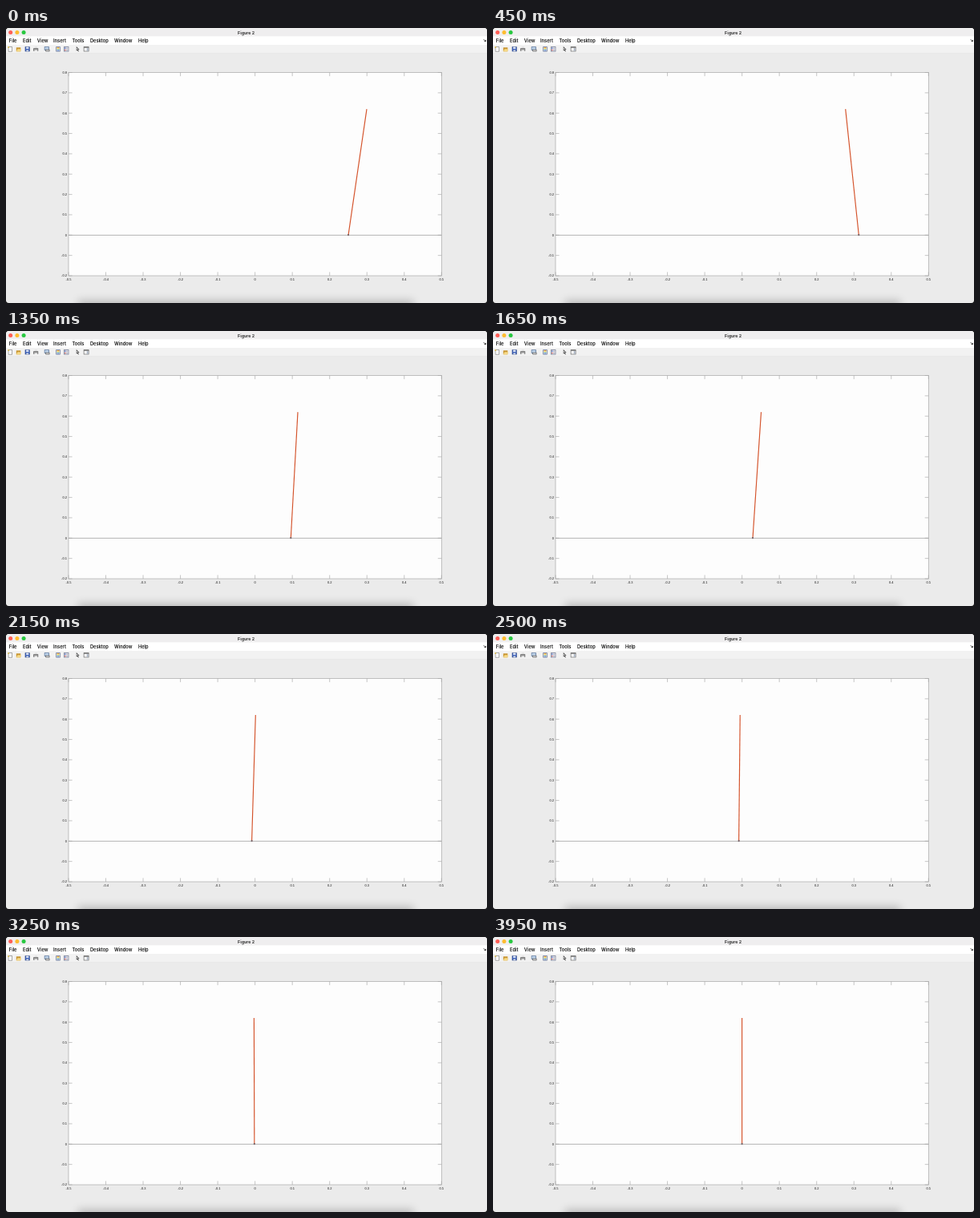
Write an HTML page with a canvas that moves like this. It is 600 by 343 pixels and loops after 4.1 s.

```html
<!DOCTYPE html>
<html lang="en">
<head>
<meta charset="utf-8">
<title>Inverted pendulum</title>
<style>
html, body { margin: 0; width: 100%; height: 100%; overflow: hidden; background: #000; }
canvas { display: block; width: 600px; height: 343px; }
</style>
</head>
<body>
<canvas id="stage"></canvas>
<script>
const W = 600, H = 343, LOOP = 4100, STEP = 50;
const canvas = document.getElementById('stage');
const ctx = canvas.getContext('2d');
const dpr = window.devicePixelRatio || 1;
canvas.width = W * dpr;
canvas.height = H * dpr;
ctx.scale(dpr, dpr);

const plot = { left: 78, right: 543.3, top: 55.5, bottom: 309 };
const px = v => plot.left + (v + 0.5) * (plot.right - plot.left);
const py = v => plot.bottom - (v + 0.2) * (plot.bottom - plot.top);

// Key poses of the swing; the motion between them is a smooth curve
const poses = [
  { t: 250, foot: 427, tip: 450 },
  { t: 450, foot: 456.3, tip: 439.7 },
  { t: 550, foot: 460.3, tip: 435.7 },
  { t: 800, foot: 437, tip: 421.8 },
  { t: 1000, foot: 404, tip: 400.5 },
  { t: 1350, foot: 355.3, tip: 364 },
  { t: 1650, foot: 324, tip: 334.5 },
  { t: 1900, foot: 311.4, tip: 319.2 },
  { t: 2150, foot: 306.6, tip: 311.3 },
  { t: 2450, foot: 306.5, tip: 308.4 },
  { t: 2850, foot: 308.7, tip: 308.8 },
  { t: 3950, foot: 310.6, tip: 310.6 }
];

const secant = (a, b, key) => (b[key] - a[key]) / (b.t - a.t);

function slope(i, key) {
  const a = poses[i - 1], b = poses[i], c = poses[i + 1];
  if (!a) return secant(b, c, key);
  if (!c) return secant(a, b, key);
  const w = (c.t - b.t) / (c.t - a.t);
  return w * secant(a, b, key) + (1 - w) * secant(b, c, key);
}

// Cubic Hermite interpolation, held at both ends
function sample(time, key) {
  const last = poses.length - 1;
  const t = Math.min(Math.max(time, poses[0].t), poses[last].t);
  let i = 0;
  while (i < last - 1 && poses[i + 1].t <= t) i++;
  const a = poses[i], b = poses[i + 1], h = b.t - a.t;
  const u = (t - a.t) / h, v = 1 - u;
  return v * v * (1 + 2 * u) * a[key] + u * v * v * h * slope(i, key)
       + u * u * (3 - 2 * u) * b[key] - u * u * v * h * slope(i + 1, key);
}

function rect(x, y, w, h, color) {
  ctx.fillStyle = color;
  ctx.fillRect(x, y, w, h);
}

function line(x1, y1, x2, y2, color, width) {
  ctx.strokeStyle = color;
  ctx.lineWidth = width;
  ctx.beginPath();
  ctx.moveTo(x1, y1);
  ctx.lineTo(x2, y2);
  ctx.stroke();
}

function dot(x, y, r, color) {
  ctx.fillStyle = color;
  ctx.beginPath();
  ctx.arc(x, y, r, 0, Math.PI * 2);
  ctx.fill();
}

function shape(points, color) {
  ctx.fillStyle = color;
  ctx.beginPath();
  points.forEach(([x, y]) => ctx.lineTo(x, y));
  ctx.fill();
}

function label(text, x, y, font, color, align = 'left') {
  ctx.font = font;
  ctx.fillStyle = color;
  ctx.textAlign = align;
  ctx.fillText(text, x, y);
}

function panel(x, y, w, h, fill, edge) {
  rect(x, y, w, h, edge);
  rect(x + 0.6, y + 0.6, w - 1.2, h - 1.2, fill);
}

// Each toolbar icon is drawn around its own centre
const icons = {
  page() {
    panel(-2.4, -3, 5, 6.2, '#ffffff', '#777777');
    dot(-2, -2.4, 1, '#d8b84a');
  },
  folder() {
    rect(-3, -2, 5.5, 5, '#c9952f');
    shape([[-3, 3], [-1.5, 0], [3.4, 0], [2, 3]], '#f5d987');
  },
  disk() {
    panel(-3, -3, 6, 6, '#3f63bd', '#27407f');
    rect(-1.6, -2.6, 3.2, 2.2, '#e6ecf7');
    rect(-1.4, 1, 2.8, 1.8, '#c5cfdf');
  },
  printer() {
    rect(-1.4, -3.2, 3.2, 3, '#e4e4e4');
    panel(-3, -1, 6, 3.4, '#9a9a9a', '#555555');
    rect(-1.8, 1.2, 3.8, 1.8, '#eeeeee');
  },
  link() {
    panel(-3.2, -3, 6, 4.4, '#bcd1e8', '#45628c');
    panel(-1.6, 0.4, 5, 2.6, '#dddddd', '#444444');
  },
  colorbar() {
    panel(-2.6, -3.1, 5.2, 6.2, '#f2f2f2', '#4a5a80');
    ['#e8a040', '#f0d060', '#7fc7a0', '#5a7fd0'].forEach((c, i) => rect(-1.4, -2.3 + i * 1.15, 2.8, 1.15, c));
  },
  legend() {
    panel(-3.1, -3.1, 6.2, 6.2, '#eeeef8', '#56617c');
    ['#4767ba', '#cc5146'].forEach((c, i) => {
      rect(-2, -1.8 + i * 2.3, 1.4, 1.4, c);
      rect(0, -1.4 + i * 2.3, 2, 0.6, '#777777');
    });
  },
  pointer() {
    shape([[-1.8, -3.2], [-1.8, 2.2], [-0.6, 1.1], [0.4, 3.2], [1.2, 2.8], [0.3, 0.8], [2, 0.8]], '#333333');
    shape([[-1.2, -1.7], [-1.2, 0.8], [0.5, 0.2]], '#ffffff');
  },
  inspector() {
    panel(-3.2, -3, 6.6, 6, '#f8f8f8', '#555555');
    rect(-3, -2.8, 6.2, 1.3, '#777777');
    rect(0.8, -1.2, 1.8, 3.6, '#a9b4c4');
  }
};
const iconX = [5.2, 15.8, 26.7, 37.2, 51, 65, 75.2, 89.6, 100];

function drawToolbar() {
  Object.values(icons).forEach((draw, i) => {
    ctx.save();
    ctx.translate(iconX[i], 26.3);
    draw();
    ctx.restore();
  });
}

function drawMenu() {
  const menu = { File: 3.8, Edit: 21, View: 38.8, Insert: 59, Tools: 82.5, Desktop: 105, Window: 135, Help: 165 };
  for (const name in menu) label(name, menu[name], 18, '600 5.7px Inter, sans-serif', '#151515');
  line(595.6, 14, 597.6, 16, '#333333', 0.8);
  shape([[598.8, 14.4], [598.8, 17.1], [596.1, 17.1]], '#333333');
}

function drawShadow() {
  ctx.save();
  ctx.shadowColor = 'rgba(0,0,0,0.22)';
  ctx.shadowBlur = 11 * dpr;
  ctx.shadowOffsetY = -4 * dpr;
  rect(90, H + 1, 418, 20, '#888888');
  ctx.restore();
}

function drawWindow() {
  rect(0, 0, W, H, '#ebebeb');
  rect(0, 0, W, 10.3, '#efeeef');
  rect(0, 10.3, W, 10.7, '#ffffff');
  rect(0, 21, W, 10.5, '#f2f2f2');
  line(0, 31.6, W, 31.6, '#e3e3e3', 0.6);
  ['#fe5f57', '#febc2e', '#28c840'].forEach((c, i) => dot(5.7 + i * 8.2, 5.6, 2.5, c));
  label('Figure 2', 299.6, 7.6, '700 5.3px Inter, sans-serif', '#383838', 'center');
  drawMenu();
  drawToolbar();
  drawShadow();
}

function drawAxes() {
  const { left, right, top, bottom } = plot;
  const grey = '#a8a8a8', ink = '#101010';
  const font = '4px "Liberation Sans", Arial, sans-serif';
  rect(left, top, right - left, bottom - top, '#fdfdfd');
  ctx.strokeStyle = grey;
  ctx.lineWidth = 0.7;
  ctx.strokeRect(left, top, right - left, bottom - top);
  for (let i = 0; i <= 10; i++) {
    const xv = (i - 5) / 10, yv = (i - 2) / 10, x = px(xv), y = py(yv);
    line(x, bottom, x, bottom - 4.6, grey, 0.65);
    line(x, top, x, top + 4.6, grey, 0.65);
    line(left, y, left + 4.6, y, grey, 0.65);
    line(right, y, right - 4.6, y, grey, 0.65);
    label(String(xv), x, 314.9, font, ink, 'center');
    label(String(yv), 76, y + 1.4, font, ink, 'right');
  }
  line(left, 258.4, right, 258.4, '#9c9c9c', 0.75);
}

function drawPendulum(t) {
  const foot = sample(t, 'foot'), tip = sample(t, 'tip');
  line(foot, 258.3, tip, 101.1, '#d4522a', 1.15);
  dot(foot, 258.1, 1.15, '#76656a');
}

function draw(now) {
  const t = Math.floor((now % LOOP) / STEP) * STEP;
  rect(0, 0, W, H, '#000000');
  ctx.save();
  ctx.beginPath();
  ctx.roundRect(0, 0, W, H, 3.5);
  ctx.clip();
  drawWindow();
  drawAxes();
  drawPendulum(t);
  ctx.restore();
}

const start = performance.now();
function tick() {
  draw(performance.now() - start);
  requestAnimationFrame(tick);
}
tick();
</script>
</body>
</html>
```
